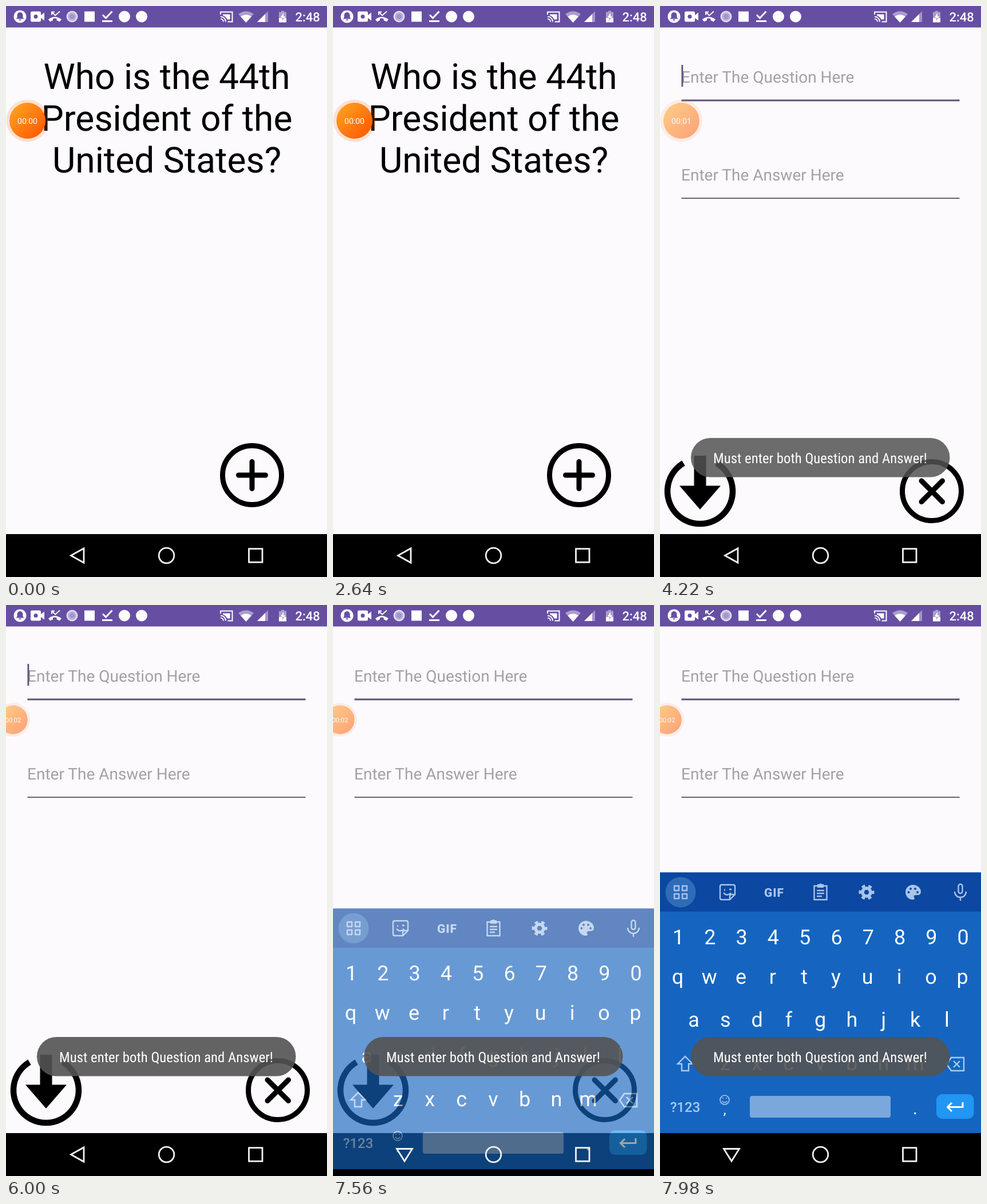
An HTML page that plays this animation: 561 px wide and 998 px high, repeating every 8000 ms.

```html
<!DOCTYPE html>
<html lang="en">
<head>
<meta charset="utf-8">
<title>Flashcards</title>
<style>
  html, body { margin: 0; width: 100%; height: 100%; overflow: hidden; background: #000; }
  svg { display: block; width: 100vw; height: 100vh; font-family: Roboto, sans-serif; text-rendering: geometricPrecision; }
  .mid { text-anchor: middle; }
  .line { fill: none; stroke: currentColor; stroke-width: 2.4; }
  .bold { fill: none; stroke: #000; stroke-width: 9; stroke-linecap: round; }
  .toast { font-family: "Roboto Condensed", Roboto, sans-serif; font-stretch: 75%; }
</style>
</head>
<body>
<svg viewBox="0 0 561 998">
  <defs>
    <linearGradient id="orange" x1="0" y1="0" x2="1" y2="1">
      <stop offset=".1" stop-color="#ffa01e"/><stop offset=".9" stop-color="#ff5a05"/>
    </linearGradient>
    <g id="page">
      <rect y="-2" width="561" height="1200"/>
      <rect width="561" height="38" fill="#664fa3"/>
      <rect y="37.5" width="561" height="885.5" fill="#fcfafd"/>
    </g>
  </defs>

  <use href="#page"/>
  <g class="mid" font-size="62.3">
    <text x="281" y="144.5">Who is the 44th</text>
    <text x="281" y="217.5">President of the</text>
    <text x="281" y="290.5">United States?</text>
  </g>
  <g class="bold">
    <circle cx="430" cy="820" r="51.5"/>
    <path d="M406.5 820h47M430 796.5v47"/>
  </g>

  <g id="form">
    <use href="#page"/>
    <g font-size="28" fill="#a3a1a4">
      <text x="37" y="133.5">Enter The Question Here</text>
      <text x="37" y="305">Enter The Answer Here</text>
    </g>
    <rect x="37.5" y="163.5" width="486" height="3" fill="#5b5378"/>
    <rect x="37.5" y="335.2" width="486" height="1.6" fill="#444148"/>
    <rect id="caret" x="37.5" y="103" width="2.8" height="38" fill="#5b5378"/>
    <path class="bold" style="stroke-width:10.5;stroke-linecap:butt" d="M41 799A57 57 0 1 0 99 799"/>
    <path d="M59.5 786h21v52.5h25.5L70 880 34 838.5h25.5z"/>
    <g class="bold">
      <circle cx="475" cy="848" r="51.5"/>
      <path d="M457 830l36.5 36.5M493.5 830l-36.5 36.5"/>
    </g>
  </g>

  <g id="keyboard" fill="#fff">
    <rect y="467.5" width="561" height="455.5" fill="#1565c0"/>
    <rect y="467.5" width="561" height="68.5" fill="#0c47a1"/>
    <circle cx="36" cy="502" r="26.5" fill="#2f6cb8"/>
    <g color="#a9c4e9" fill="#a9c4e9">
      <path class="line" d="M25 491h8v8h-8zM39 491h8v8h-8zM25 505h8v8h-8zM39 505h8v8h-8z" stroke-linejoin="round"/>
      <path class="line" d="M108 489h20q3 0 3 3v14l-9 9h-14q-3 0-3-3v-20q0-3 3-3zM131 506h-6q-3 0-3 3v6M111 503q6 7 13 0" stroke-linejoin="round"/>
      <path class="line" d="M112 498h2M121 497h4"/>
      <text class="mid" x="199.5" y="509.5" font-size="21" font-weight="900" letter-spacing="1">GIF</text>
      <path class="line" d="M269.5 491h22v24h-22zM274 499h13M274 504h13M274 509h9"/>
      <path d="M275 488h3a3 3 0 0 1 5 0h3v6h-11z"/>
      <circle class="line" cx="361" cy="502" r="7" style="stroke-width:5.5"/>
      <circle class="line" cx="361" cy="502" r="11" style="stroke-width:5;stroke-dasharray:5.76" stroke-dashoffset="2.88"/>
      <path d="M442 489a13 13 0 0 0 0 26c4 0 3-3 2-4-1-3 1-4 3-4h4c3 0 5-3 5-6 0-7-7-12-14-12z"/>
      <g fill="#0c47a1">
        <circle cx="434.5" cy="502" r="2"/><circle cx="438" cy="496" r="2"/>
        <circle cx="446" cy="496" r="2"/><circle cx="450" cy="502" r="2"/>
      </g>
      <rect class="line" x="521.5" y="488" width="7" height="16" rx="3.5"/>
      <path class="line" d="M515 501a10 10 0 0 0 20 0M525 511v6"/>
    </g>
    <g id="keys" class="mid" font-size="36"></g>
    <path class="line" color="#a9cbf2" d="M44 789l13 13h-7v12h-12v-12h-7z"/>
    <path class="line" color="#a9cbf2" d="M509 791h22v23h-22l-8-11.5zM513 797l11 11M524 797l-11 11"/>
    <text class="mid" x="44" y="885.5" font-size="24" font-weight="500" fill="#a9cbf2">?123</text>
    <g color="#a9cbf2" class="line" style="stroke-width:1.6">
      <circle cx="113" cy="865" r="8"/>
      <path d="M109 862h2M115 862h2M108.5 867q4.5 5 9 0"/>
    </g>
    <text class="mid" x="113" y="890" font-size="24">,</text>
    <text class="mid" x="446" y="890" font-size="30">.</text>
    <rect x="157" y="858" width="246" height="38" rx="4" fill="#7ba8dc"/>
    <rect x="483" y="855" width="65.5" height="43" rx="10" fill="#2196f3"/>
    <path class="line" color="#fff" style="stroke-width:3" d="M529 869v8.5h-26M510 870l-7.5 7.5 7.5 7.5"/>
  </g>

  <g class="line" color="#f2f2f2" style="stroke-width:2.8">
    <path id="back"/>
    <circle cx="280.5" cy="960.5" r="13.3"/>
    <rect x="424.5" y="948.7" width="23.5" height="23.5"/>
  </g>

  <g fill="#fff" color="#fff">
    <circle cx="24.5" cy="18.5" r="11"/>
    <path fill="#664fa3" d="M17.5 22.5l2-2.5v-4a5 5 0 0 1 10 0v4l2 2.5zM22.5 23.5h4a2 2 0 0 1-4 0z"/>
    <path d="M45.5 9.5h13q2.5 0 2.5 2.5v4l6-4.5v14l-6-4.5v4q0 2.5-2.5 2.5h-13q-2.5 0-2.5-2.5v-13q0-2.5 2.5-2.5z"/>
    <circle cx="52" cy="18.5" r="3.5" fill="#664fa3"/>
    <path d="M74 23.5q11-9 23 0l-3.5 4-5-2.5v-3q-3.5-1-6.5 0v3l-5 2.5z"/>
    <path class="line" style="stroke-width:2" d="M80 15.5v-5h5M80 10.5l6 6 8-7"/>
    <circle cx="115.5" cy="18.5" r="8.7" fill="#bdb3dc" stroke="#e2dcf1" stroke-width="2.5"/>
    <circle cx="115.5" cy="18.5" r="5" fill="#a398cc"/>
    <rect x="137" y="9.5" width="18" height="18"/>
    <path class="line" style="stroke-width:3" d="M169 15.5l5.5 5.5 11-11.5M168 26.5h18"/>
    <circle cx="207" cy="18.5" r="10"/>
    <circle cx="237" cy="18.5" r="10"/>
    <path class="line" style="stroke-width:2" d="M375 15v-4.5h20.5v17h-8M375 18.5a9 9 0 0 1 9 9M375 22.5a5 5 0 0 1 5 5"/>
    <path d="M379 14.5h12.5v9h-5q-2-5-7.5-7z"/>
    <path d="M406 14q13.5-9.5 27 0l-13.5 15z" opacity=".45"/>
    <path d="M410 18.5q9.5-6.5 19 0l-9.5 10.5z"/>
    <path d="M458 9v19h-19z" opacity=".4"/>
    <path d="M453 14v14h-14z"/>
    <path d="M481 8.5h5v2h4v18h-13v-18h4z" opacity=".45"/>
    <path d="M477 21h13v7.5h-13zM485 12l-5 8h3v6l5-8h-3z"/>
    <text x="505.5" y="27.3" font-size="22" font-weight="500">2:48</text>
  </g>

  <g id="bubble">
    <circle r="37" fill="#ff7830" opacity=".2"/>
    <circle r="31.5" fill="url(#orange)"/>
    <text id="timer" class="mid" y="5.5" font-size="14" fill="#fff"></text>
  </g>

  <g id="toast">
    <rect x="54" y="755" width="452.5" height="68.5" rx="34" fill="#545454" opacity=".9"/>
    <text class="mid toast" x="280" y="798.5" font-size="24.75" fill="#fff">Must enter both Question and Answer!</text>
  </g>
</svg>
<script>
const LOOP = 8000;
const el = id => document.getElementById(id);
const set = (id, name, value) => el(id).setAttribute(name, value);
const ramp = (t, start, length) => Math.min(1, Math.max(0, (t - start) / length));
const decel = (u, power) => 1 - (1 - u) ** power;

// letters, first centre x, baseline
const rows = [["1234567890", 32, 593], ["qwertyuiop", 31, 662], ["asdfghjkl", 59, 737], ["zxcvbnm", 114, 813]];
el("keys").innerHTML = rows.map(([letters, x, y]) =>
  [...letters].map((c, i) => `<text x="${x + i * 55.3}" y="${y}">${c}</text>`).join("")).join("");

function draw(t) {
  // form slides up over the question
  const open = ramp(t, 3090, 980);
  set("form", "transform", `translate(0 ${80 * (1 - decel(open, 5))})`);
  set("form", "opacity", decel(ramp(t, 3090, 560), 4));
  set("caret", "opacity", t < 4340 || (t >= 5740 && t < 7140) ? 1 : 0);

  set("toast", "opacity", decel(ramp(t, 3168, 1390), 2));

  // recorder bubble dims, then docks at the edge
  const dock = (1 - Math.cos(Math.PI * ramp(t, 4360, 820))) / 2;
  set("bubble", "transform", `translate(${37.5 - 25 * dock} 200.5) scale(${1 - 0.2 * dock})`);
  set("bubble", "opacity", 1 - 0.47 * ramp(t, 4000, 200));
  el("timer").textContent = "00:0" + (t < 3200 ? 0 : t < 6000 ? 1 : 2);

  const rise = decel(ramp(t, 7280, 700), 2);
  set("keyboard", "transform", `translate(0 ${176 * (1 - rise)})`);
  set("keyboard", "opacity", rise);
  set("back", "d", t < 7280 ? "M136 948v25l-22.5-12.5z" : "M111.5 950.5h27l-13.5 21.5z");
}

function tick() {
  draw(performance.now() % LOOP);
  requestAnimationFrame(tick);
}
tick();
</script>
</body>
</html>
```
